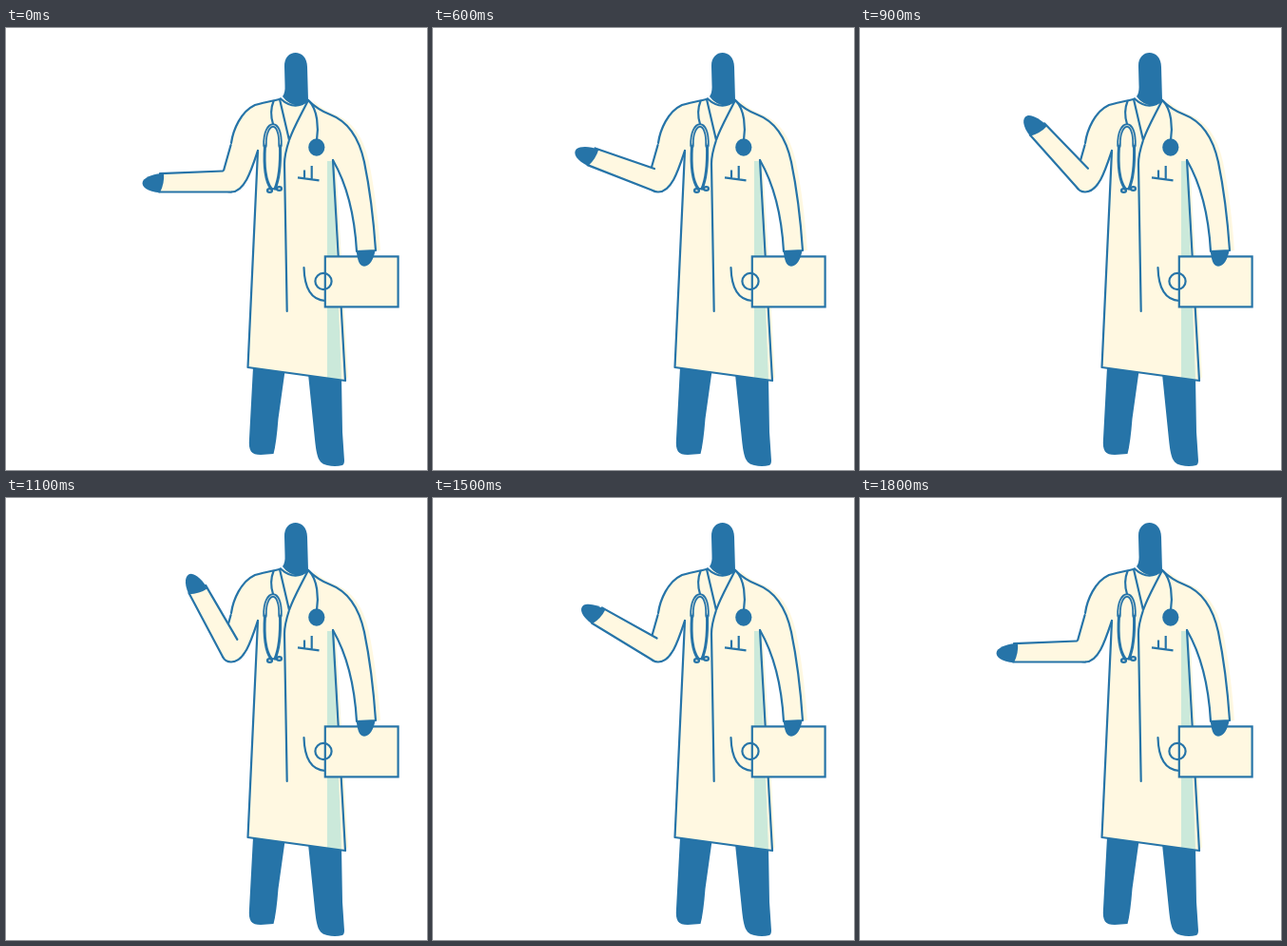
These frames come from a looping animation (443 by 465 pixels, 2800 ms). An HTML page without scripts:

```html
<!DOCTYPE html>
<html lang="en">
<head>
<meta charset="utf-8">
<title>Doctor raising an arm</title>
<style>
  @property --lift { syntax: "<angle>"; inherits: true; initial-value: 0deg; }

  html, body { margin: 0; width: 100%; height: 100%; overflow: hidden; background: #fff; }
  svg { display: block; width: 100%; height: 100%; }

  .line { fill: none; stroke: #2674a8; stroke-width: 2.2; stroke-linecap: round; stroke-linejoin: round; }
  .square { stroke-linecap: butt; stroke-linejoin: miter; }
  .blue { fill: #2674a8; }
  .cream { fill: #fff8e1; }
  .mint { fill: #cbe9da; }

  .forearm {
    transform: rotate(var(--lift));
    transform-origin: 237px 162.5px;
    animation: lift 2.8s steps(2) infinite;
  }

  /* Two 100 ms poses between key angles, the same up and down. */
  @keyframes lift {
    0%, 64.28%, 100% { --lift: 0deg; animation-timing-function: step-end; }
    17.85% { --lift: 11.3deg; }
    24.99%, 53.56% { --lift: 31.4deg; }
    32.13%, 46.42% { --lift: 48.2deg; }
    39.28% { --lift: 62deg; }
    60.7% { --lift: 11.3deg; animation-timing-function: step-end; }
  }
</style>
</head>
<body>
<svg viewBox="0 0 443 465">
  <defs>
    <path id="sleeve" d="M318 76C325 83 333 88 341 91C362 99 372 118 377 141C383 170 387 205 389 234L369 235C367 200 359 165 344 139"/>
    <path id="shoulder" d="M289 74.500C280 77 268 79 262 81C247 88 239 107 237 121"/>
    <path id="elbow" d="M265 129C258 150 251 172.500 237 172.500A10 10 0 0 1 228 167"/>
    <path id="arch" d="M272.500 124C272 109 277 102.500 281 102.500C285 102.500 289 109 288.500 124"/>
  </defs>

  <!-- legs -->
  <g class="blue">
    <path d="M260 357L256 432C255 445 258 449 268 449L281.500 448Q284.500 437 286.500 411L293.500 361Z"/>
    <path d="M318 364L325 433C327 452 329 458 338 460Q346 462 354 460Q356 459 356 455L354 425L353 368Z"/>
  </g>

  <!-- coat -->
  <g class="cream">
    <use href="#sleeve" x="5"/>
    <use href="#sleeve"/>
    <use href="#shoulder"/>
    <path d="M289 75L318 76L344 92L347 139L360 367L357 371L254.500 357L265 129L262 81Z"/>
    <path d="M262 81L237 121L229 150L232 166L240 170L250 158L265 129L289 75Z"/>
    <use href="#elbow"/>
  </g>
  <path class="mint" d="M338 140H344L353 369.500L338 368Z"/>

  <!-- raised arm: the forearm hides the part of the sleeve lines it overlaps -->
  <use class="line" href="#elbow"/>
  <path class="line" d="M236.600 123L229 150"/>
  <g class="forearm">
    <path class="cream" d="M161 153.100L227.500 150.500L237 151V172.500H161Z"/>
    <path class="line" d="M162 153.100L228 150.500M161 172.500H237"/>
    <path class="blue" d="M166 153C157 153 147 156 144 161C141.500 167 149 172.500 162 173.200Q167 163 166 153Z"/>
  </g>

  <!-- head -->
  <path class="blue" d="M293 41C292 21 317 21 317 41L318 76C312 85 298 82 291 72Q294 68 293.500 60Z"/>

  <g class="line">
    <use href="#shoulder"/>
    <use href="#sleeve"/>
    <path d="M265 129L254.500 357L357 371L344 139"/>
    <path d="M289 74.500Q304 88 318 76"/>
    <path d="M288 75L298 118M318 76C309 94 302 106 298 118Q293 133 293 143L295.700 298"/>
    <path class="square" d="M307 157.400L329.500 160.300M314 149.500V158M321.700 145V159"/>
    <path d="M313.500 252C314 273 320 286 336 287"/>
  </g>

  <!-- stethoscope -->
  <g class="line">
    <path d="M281.500 77Q277 88 281 101M319 77C328 86 329 105 327 118"/>
    <use href="#arch" stroke-width="4.400"/>
    <use href="#arch" stroke="#fff8e1" stroke-width=".8"/>
    <path d="M272.500 124C271 147 273 161 279 169M288.500 124C289 145 287 160 283 169" stroke-width="3"/>
    <ellipse cx="277.500" cy="171" rx="2.500" ry="1.900"/>
    <ellipse cx="287.500" cy="169" rx="2.500" ry="1.900"/>
    <path d="M279 169L285 169.500"/>
  </g>
  <ellipse class="blue" cx="326.800" cy="125.500" rx="8.600" ry="9.300"/>

  <!-- case and hand -->
  <rect class="cream line square" style="fill:#fff8e1" x="335.800" y="240.400" width="76.800" height="53"/>
  <circle class="line" cx="334" cy="266.500" r="8.600"/>
  <path class="blue" d="M368.500 234H388.500C387 243 383 250.700 377 250.700C371 250.700 370 243 368.500 234Z"/>
</svg>
</body>
</html>
```
